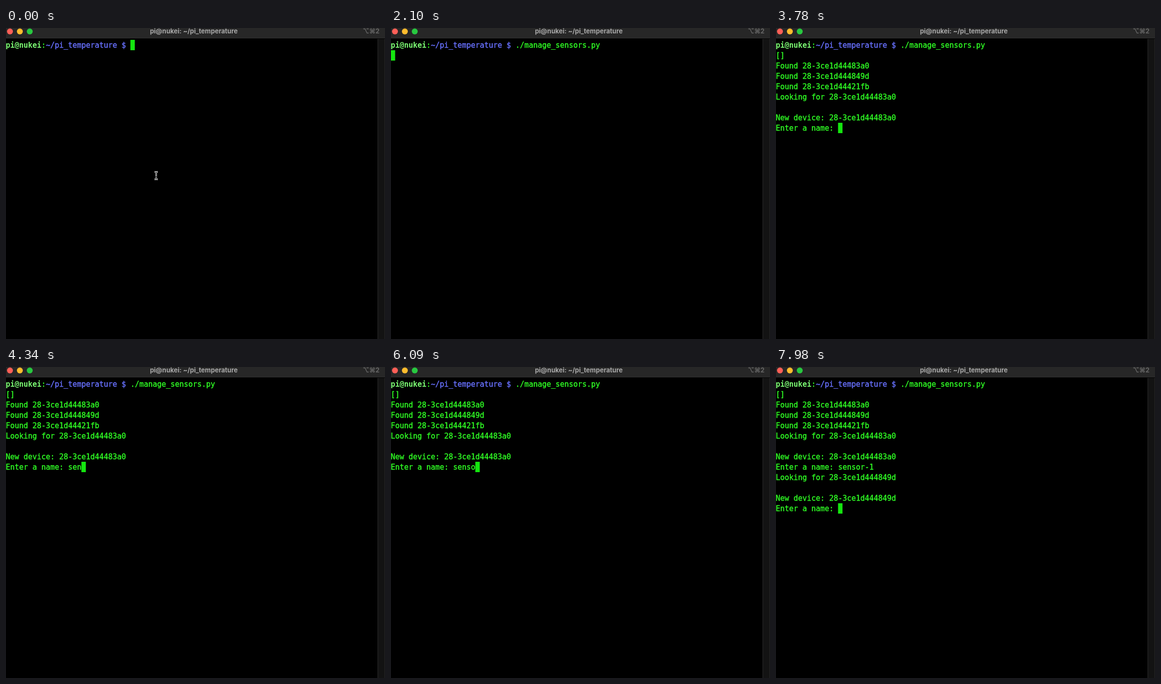
Animation, 766 px wide and 630 px high, one loop 8000 ms. Source, as an HTML page with a canvas:

```html
<!DOCTYPE html>
<html lang="en">
<head>
<meta charset="utf-8">
<title>Terminal</title>
<style>
  html, body { margin: 0; width: 100%; height: 100%; overflow: hidden; background: #000; }
  canvas { display: block; }
</style>
</head>
<body>
<canvas id="stage" width="766" height="630"></canvas>
<script>
const ctx = document.getElementById('stage').getContext('2d');
const LOOP = 8000, CELL = 9, LINE = 21, LEFT = -0.6, TOP = 24;
const MONO = '15px "DejaVu Sans Mono", monospace';
const SANS = '700 13px Inter, sans-serif';
const GREEN = '#2ffb24', BRIGHT = '#7dfc74', BLUE = '#6871ff';

const USER = 'pi@nukei', PATH = '~/pi_temperature $';
const PROMPT = `${USER}:${PATH} `;
const IDS = ['28-3ce1d44483a0', '28-3ce1d444849d', '28-3ce1d44421fb'];
const ask = id => `Looking for ${id}\n\nNew device: ${id}\nEnter a name: `;

// Terminal stream: [time, characters]; \b deletes one character
const stream = [
  [0, PROMPT],
  [420, '.'], [560, '/'], [630, 'm'], [1050, 'anage_sensors.py '],
  [1960, '\n'],
  [2520, '[]\n' + IDS.map(id => `Found ${id}\n`).join('') + ask(IDS[0])],
  [4130, 's'], [4200, 'e'], [4340, 'n'], [4550, 's'], [4690, 'r'], [4830, 'o'],
  [5600, '\b'], [5740, '\b'], [6020, 'o'], [6230, 'r'],
  [7000, '-'], [7210, '1'],
  [7560, '\n' + ask(IDS[1])]
];

function screenAt(t) {
  let text = '';
  for (const [time, chars] of stream) {
    if (time > t) break;
    text = chars === '\b' ? text.slice(0, -1) : text + chars;
  }
  return text.split('\n');
}

function rect(x, y, w, h, color) {
  ctx.fillStyle = color;
  ctx.fillRect(x, y, w, h);
}

function label(text, x, align, color) {
  ctx.font = SANS;
  ctx.textAlign = align;
  ctx.fillStyle = color;
  ctx.fillText(text, x, 11);
}

function drawWindow() {
  rect(0, 0, 766, 630, '#000');
  rect(0, 0, 766, 21, '#272727');
  rect(0, 20, 766, 1, '#303030');
  rect(751, 22, 15, 608, '#131313');
  rect(751, 22, 1, 608, '#2b2b2b');
  rect(765, 22, 1, 608, '#262626');
  ['#ff5f57', '#febc2e', '#28c840'].forEach((color, i) => {
    ctx.fillStyle = color;
    ctx.beginPath();
    ctx.arc(8 + 20 * i, 7, 6, 0, 2 * Math.PI);
    ctx.fill();
  });
  label(`${USER}: ~/pi_temperature`, 379.5, 'center', '#a9a9a9');
  label('⌥⌘2', 755, 'right', '#666');
}

// A hairline stroke thickens the regular weight
function drawText(text, col, row, color, weight = '') {
  ctx.font = `${weight} ${MONO}`;
  ctx.textAlign = 'left';
  ctx.fillStyle = ctx.strokeStyle = color;
  ctx.lineWidth = 0.4;
  [...text].forEach((c, i) => {
    const x = LEFT + (col + i) * CELL, y = TOP + row * LINE + 16;
    ctx.fillText(c, x, y);
    if (!weight) ctx.strokeText(c, x, y);
  });
}

function drawTerminal(lines) {
  const row = lines.length - 1;
  rect(LEFT + lines[row].length * CELL, TOP + row * LINE, CELL, LINE, '#14e60f');
  drawText(USER, 0, 0, BRIGHT, 'bold');
  drawText(':', USER.length, 0, GREEN);
  drawText(PATH, USER.length + 1, 0, BLUE);
  drawText(lines[0].slice(PROMPT.length), PROMPT.length, 0, GREEN);
  for (let i = 1; i <= row; i++) drawText(lines[i], 0, i, GREEN);
}

function drawPointer() {
  const beam = new Path2D('M300 291.5h1.5q2 0 2 2q0-2 2-2h1.5M303.5 293v12M300 306.5h1.5q2 0 2-2q0 2 2 2h1.5M302 301.5h3');
  for (const [color, width] of [['#e8e8e8', 3], ['#000', 1]]) {
    ctx.strokeStyle = color;
    ctx.lineWidth = width;
    ctx.stroke(beam);
  }
}

function frame() {
  const t = performance.now() % LOOP;
  drawWindow();
  drawTerminal(screenAt(t));
  if (t < 420) drawPointer();
  requestAnimationFrame(frame);
}
frame();
</script>
</body>
</html>
```
